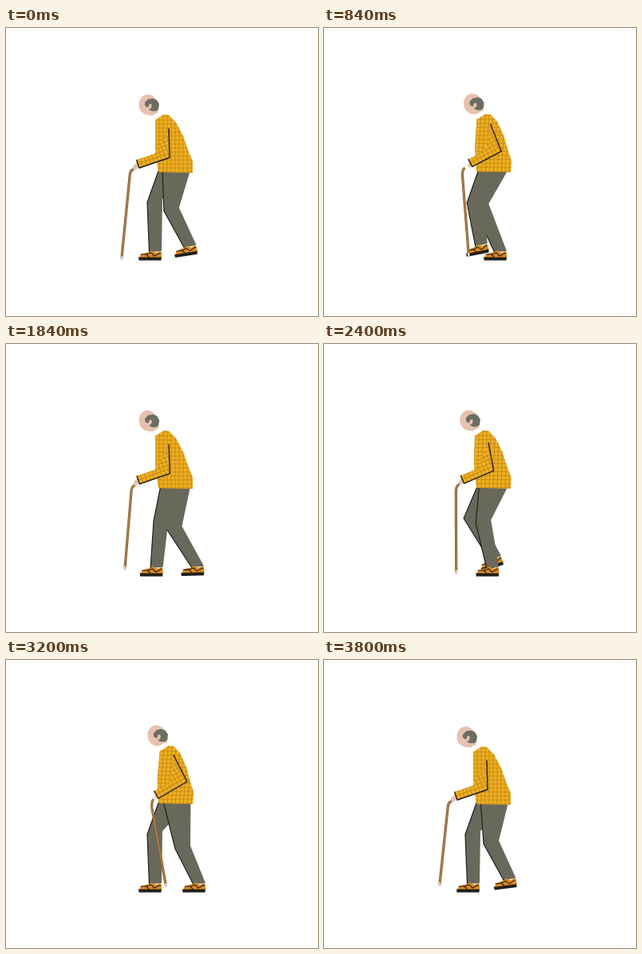
Recreate the animation shown at these times as an HTML page with a canvas. Size 391 by 360 pixels, loop 3.84 s.

```html
<!DOCTYPE html>
<html lang="en">
<head>
<meta charset="utf-8">
<title>Walking with a cane</title>
<style>
  html, body { margin: 0; width: 100%; height: 100%; overflow: hidden; background: #fff; }
  canvas { display: block; }
</style>
</head>
<body>
<canvas id="stage" width="391" height="360"></canvas>
<script>
const ctx = document.getElementById('stage').getContext('2d');
const LOOP = 3840, STEP = 40;
const INK = '#211f1c', TROUSERS = '#69695b', SKIN = '#e6c2af', HAIR = '#6c6d61';

const clamp = v => Math.min(1, Math.max(0, v));
const progress = (t, from, to) => clamp((t - from) / (to - from));
const smooth = u => u * u * (3 - 2 * u);

function trace(points) {
  ctx.beginPath();
  for (let i = 0; i < points.length; i += 2) ctx.lineTo(points[i], points[i + 1]);
}

function fill(points, color) {
  trace(points);
  ctx.fillStyle = color;
  ctx.fill();
}

function stroke(points, color, width) {
  trace(points);
  ctx.strokeStyle = color;
  ctx.lineWidth = width;
  ctx.stroke();
}

function oval(x, y, rx, ry, tilt, color) {
  ctx.beginPath();
  ctx.ellipse(x, y, rx, ry, tilt, 0, 7);
  ctx.fillStyle = color;
  ctx.fill();
}

function plaid(points, angle) {
  fill(points, '#eeb01f');
  ctx.save();
  ctx.clip();
  ctx.translate(points[0], points[1]);
  ctx.rotate(angle);
  for (let d = -100; d <= 100; d += 5) {
    stroke([d, -100, d, 100], '#c4861a', .9);
    stroke([-100, d, 100, d], '#c4861a', .9);
  }
  ctx.restore();
}

function shoe() {
  fill([1,-3, 3,-7, 8,-9, 14,-10, 17,-12, 22,-9, 27,-11, 29,-8, 29,-3], '#dc8a1c');
  fill([0,-3.5, 29,-3.5, 28.5,.5, .5,.5], INK);
  stroke([3,-7, 10,-7, 13,-4], INK, 1.1);
  stroke([10,-7, 16,-9, 20,-5, 28,-9], INK, 1.1);
}

// The foot rides back with the ground, rests, then swings forward.
function leg(time, near) {
  const phase = time % LOOP;
  const swing = progress(phase, 1800, 3200);
  const back = progress(phase, 0, 1360) - swing;
  const lift = Math.sin(Math.PI * swing), bend = back * back;
  const toeX = 166 + 55 * back, toeY = 290 - 6.5 * lift;
  const kneeX = 177 + 27 * bend - 11 * lift + 8 * near;
  const kneeY = 218 + 15 * bend - 5 * lift + 3 * near;
  const angle = -.3 * lift, cos = Math.cos(angle), sin = Math.sin(angle);
  const onFoot = (x, y) => [toeX + x * cos - y * sin, toeY + x * sin + y * cos];

  const front = [192 + 3 * bend + 2 * near, 176, kneeX, kneeY, ...onFoot(13.5, -10)];
  fill([...front, ...onFoot(29, -11), kneeX + 19, kneeY - 4, 231.5, 176], TROUSERS);
  stroke(front, INK, 1.2);
  ctx.save();
  ctx.translate(toeX, toeY);
  ctx.rotate(angle);
  shoe();
  ctx.restore();
}

function cane(back, swing, lean) {
  const x = 159 + 26 * back, y = 177 - 2 * back;
  const tipX = 145 + 57 * back, tipY = 289 - 6 * back - 7 * Math.sqrt(swing);
  const hook = x - 4 + 2.5 * lean;
  ctx.beginPath();
  ctx.moveTo(x, y);
  ctx.quadraticCurveTo(hook, y + 2, hook, y + 9);
  ctx.lineTo(tipX, tipY - 2);
  for (const [color, width] of [['#7d5a32', 3.2], ['#ad8046', 1.8]]) {
    ctx.strokeStyle = color;
    ctx.lineWidth = width;
    ctx.stroke();
  }
  stroke([tipX, tipY - 3, tipX, tipY], '#ddd2c8', 2.6);
}

function head(lean) {
  ctx.save();
  ctx.translate(179 + 11 * lean, 96 - 1.5 * lean);
  ctx.rotate(-.06 * lean);
  fill([-4,9, 11,4, 12,12, 7,14, 1,13], SKIN);
  oval(-1, 0, 11.5, 13, -.15, SKIN);
  fill([-5,-3, -1,-7, 5,-8, 10,-6, 13,-1, 12,6, 9,8, 4,8, 0,6, 2,3, -2,3, -5,1], HAIR);
  oval(1.5, 2, 2, 3.2, .2, SKIN);
  ctx.restore();
}

function torso(lean) {
  ctx.save();
  ctx.transform(1, 0, -.085 * lean, 1, 15.5 * lean, -lean);
  fill([184,109, 190,118, 199,108, 194,104], '#fff');
  plaid([187,115, 187,150, 188,160, 191,180, 234,181, 234,167, 228,152, 222,135, 213,118, 204,109, 198,108], 0);
  ctx.restore();
}

function arm(lean) {
  const shoulder = [204 + 6 * lean, 126 - 7 * lean];
  const elbow = [205 + 22 * lean, 162 - 10 * lean];
  const cuff = [167 + 24 * lean, 175 - 2 * lean];
  const angle = Math.atan2(elbow[1] - cuff[1], elbow[0] - cuff[0]);
  const cos = Math.cos(angle), sin = Math.sin(angle);
  const onForearm = (along, up) => [cuff[0] + along * cos + up * sin, cuff[1] + along * sin - up * cos];

  const hand = 1 - .5 * lean;
  stroke([...onForearm(1, 5), cuff[0] - 5 * hand, cuff[1] - 2 + hand], SKIN, 3 + 3 * hand);
  plaid([...onForearm(0, 10.5), ...onForearm(24, 10.5), ...shoulder, ...elbow, ...cuff], angle);
  stroke([...shoulder, ...elbow, ...cuff, ...onForearm(0, 10.5)], INK, 1.4);
}

function draw(time) {
  ctx.fillStyle = '#fff';
  ctx.fillRect(0, 0, 391, 360);
  ctx.lineCap = ctx.lineJoin = 'round';
  const phase = time % (LOOP / 2);
  const swing = progress(phase, 1320, 1880);
  const back = progress(phase, 0, 1320) - swing;
  const lean = smooth(clamp(1.1 * back));
  leg(time, 0);
  leg(time + 2040, 1);
  cane(back, swing, lean);
  head(lean);
  torso(lean);
  arm(lean);
}

let start;
function tick(now) {
  start ??= now;
  draw(Math.floor((now - start) % LOOP / STEP) * STEP);
  requestAnimationFrame(tick);
}
draw(0);
requestAnimationFrame(tick);
</script>
</body>
</html>
```
